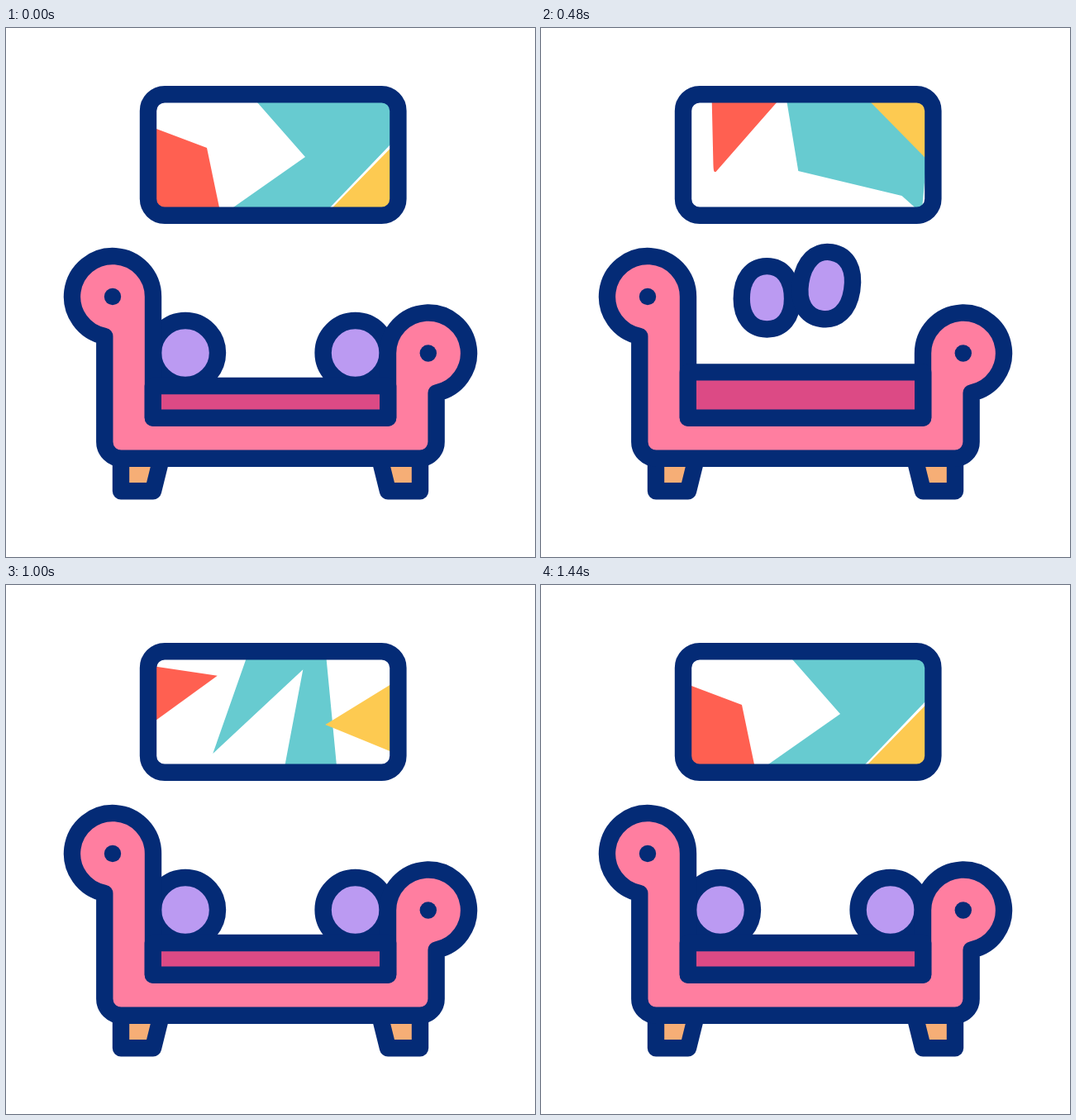
An HTML page that plays this animation: 640x640 px, repeating every 1480 ms.

```html
<!DOCTYPE html>
<html lang="en">
<head>
<meta charset="utf-8">
<title>Sofa</title>
<style>
  html, body { margin: 0; width: 100%; height: 100%; overflow: hidden; background: #fff; }
  svg { display: block; width: 100%; height: 100%; }
  .line { stroke: #042b76; stroke-width: 20.4; stroke-linejoin: round; }
  .frame { fill: none; }
  .pillow { fill: #bb9af2; }
  .seat { fill: #dc4a85; }
  .body { fill: #ff7ea0; }
  .leg { fill: #f6ae76; }
  .dot { fill: #042b76; }
</style>
</head>
<body>
<svg viewBox="0 0 640 640">
  <clipPath id="canvas"><rect x="176" y="84" width="294" height="139" rx="16"/></clipPath>
  <g clip-path="url(#canvas)">
    <path id="red" fill="#ff6051"/>
    <path id="teal" fill="#67cbd0"/>
    <path id="yellow" fill="#fdca51" d="M386 158L506 93V215Z"/>
  </g>
  <rect class="line frame" x="172" y="80.2" width="302.4" height="146.6" rx="20"/>

  <path id="leftPillow" class="line pillow"/>
  <path id="rightPillow" class="line pillow"/>
  <path class="line leg" d="M139 520H188L178 560.3H139Z"/>
  <path class="line leg" d="M501 520H452L462 560.3H501Z"/>
  <path class="line body" d="M178 325A49 49 0 1 0 119.3 373V500.7A20 20 0 0 0 139.3 520.7H500.6A20 20 0 0 0 520.6 500.7V441.5A49 49 0 1 0 462 393.5V471.6H178Z"/>
  <path id="seat" class="line seat"/>
  <circle class="dot" cx="129" cy="325" r="10.2"/>
  <circle class="dot" cx="510.8" cy="393.5" r="10.2"/>
</svg>
<script>
const LOOP = 1480, STEP = 40, START = 40, END = 1440, PEAK = 400;
const $ = id => document.getElementById(id);
const draw = (id, d) => $(id).setAttribute('d', d);
const place = (id, transform) => $(id).setAttribute('transform', transform);

const smooth = u => u * u * (3 - 2 * u);
const fall = u => u * u;
const settle = u => u * (2 - u);
const progress = (t, from, to) => Math.min(1, Math.max(0, (t - from) / (to - from)));

// Each key is [time, pose, easing towards that pose].
function tween(t, keys) {
  let pose = keys[0][1];
  for (let i = 1; i < keys.length; i++) {
    const [time, next, ease = smooth] = keys[i];
    const u = ease(progress(t, keys[i - 1][0], time));
    pose = pose.map((v, k) => v + (next[k] - v) * u);
  }
  return pose;
}

const artwork = (t, [home, high, wide]) =>
  tween(t, [[START, home], [PEAK, high], [960, wide], [END, home]]);

const red = [
  [182, 122, 243, 145, 258, 217, 182, 217],
  [208, 76, 300, 74, 213.5, 174.5, 210.5, 174.5],
  [180, 98, 256, 109, 178, 164, 177, 164]
];
const teal = [
  [304, 90, 362, 156, 275, 217, 374, 236, 484, 121, 470, 90],
  [298, 90, 315, 171, 441, 209, 468, 224, 473, 126, 472, 90],
  [290, 90, 248, 205, 361, 100, 334, 232, 400, 238, 386, 90]
];

// Pillow pose: x, y, radii, tilt, corner fullness, sag of the widest part.
const rest = x => [x, 393, 39, 39, 0, .552, 0];
const pillows = {
  leftPillow: [rest(217), [277, 321.4, 29.7, 38.6, 0, .62, 1], [244.5, 365.5, 38.3, 34.4, 0, .6, 3.5]],
  rightPillow: [rest(422.6), [341.8, 303.5, 30.6, 41.7, 10, .62, 1], [373.3, 376.4, 37.8, 33.4, 0, .59, 0]]
};

// Quadrilateral whose last corner is rounded.
function roundedQuad([ax, ay, bx, by, cx, cy, dx, dy]) {
  const toward = (x, y) => {
    const u = Math.min(.5, 9 / (Math.hypot(x - dx, y - dy) || 1));
    return [dx + (x - dx) * u, dy + (y - dy) * u];
  };
  return `M${[ax, ay, bx, by, cx, cy, ...toward(cx, cy)]}Q${[dx, dy, ...toward(ax, ay)]}Z`;
}

function blob(rx, ry, k, sag) {
  const kx = rx * k, up = sag - (ry + sag) * k, down = sag + (ry - sag) * k;
  return `M0 ${-ry}C${[kx, -ry, rx, up, rx, sag]} ${[rx, down, kx, ry, 0, ry]}
    ${[-kx, ry, -rx, down, -rx, sag]} ${[-rx, up, -kx, -ry, 0, -ry]}Z`;
}

function drawPillow(id, t) {
  const [home, touch, squash] = pillows[id];
  const [x, y, rx, ry, tilt, k, sag] = tween(t,
    [[START, home], [PEAK, touch], [640, squash, fall], [800, home, settle]]);
  const s = smooth(progress(t, START, PEAK));
  const lift = 40 * s * (1 - s);
  draw(id, blob(rx, ry, k, sag));
  place(id, `translate(${x} ${y - lift}) rotate(${tilt})`);
}

function render(t) {
  draw('red', roundedQuad(artwork(t, red)));
  draw('teal', `M${artwork(t, teal)}Z`);
  const [angle] = tween(t, [[START, [-17.2]], [PEAK, [20.8]], [1420, [-17.2]]]);
  place('yellow', `rotate(${angle} 586 158)`);

  Object.keys(pillows).forEach(id => drawPillow(id, t));
  const [top] = tween(t, [[START, [433]], [300, [412.3]], [PEAK, [412.3]], [720, [438.5]], [840, [433]]]);
  draw('seat', `M177.8 471.8V${top}H462.2V471.8Z`);
}

function tick() {
  const t = performance.now() % LOOP;
  render(Math.floor(t / STEP) * STEP);
  requestAnimationFrame(tick);
}
tick();
</script>
</body>
</html>
```
